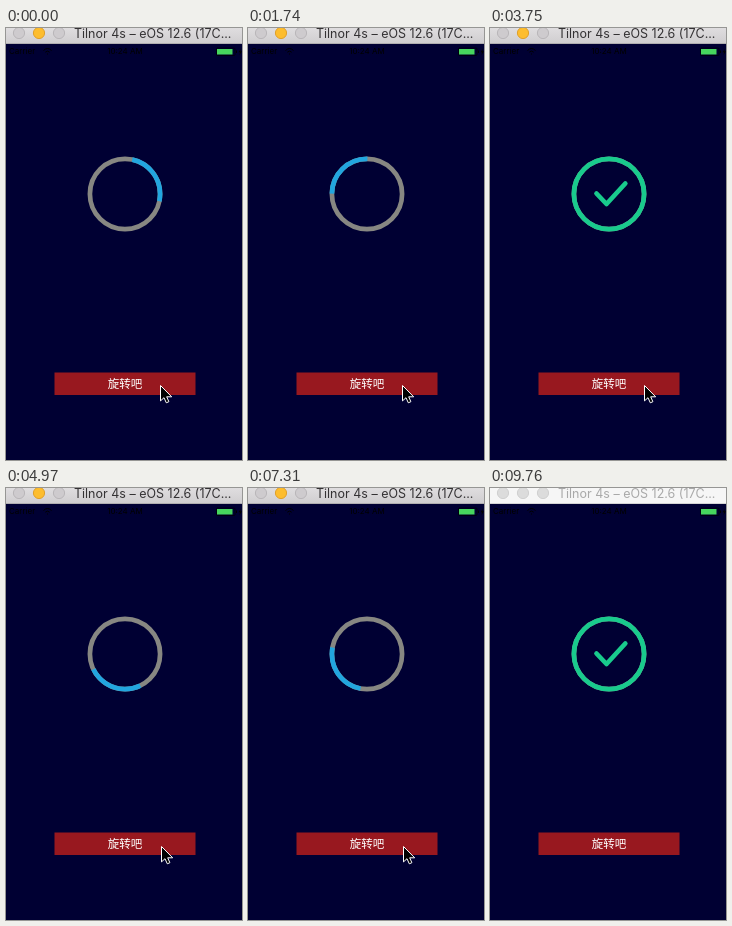
Write an HTML page that moves like this. It is 236 px wide and 432 px high and loops after 9860 ms.

```html
<!DOCTYPE html>
<html lang="zh">
<head>
<meta charset="utf-8">
<title>Loading ring</title>
<style>
  html, body { margin: 0; width: 100%; height: 100%; overflow: hidden; background: #000033; }
  svg { display: block; width: 236px; height: 432px; }
  text { font-family: Inter, Roboto, sans-serif; }
  .bar { fill: url(#metal); }
  .edge { fill: #b0aeb0; }
  .title { font-size: 12.5px; fill: #343234; }
  .lights { fill: #cecbce; stroke: #b9b6b9; }
  .lights .middle { fill: #fdbd2e; stroke: #e0a02a; }
  .inactive .bar { fill: #f6f6f6; }
  .inactive .edge { fill: #d4d4d4; }
  .inactive .title { fill: #a9a9a9; }
  .inactive .lights, .inactive .lights .middle { fill: #dcdcdc; stroke: #d0d0d0; }
  .status { font-size: 8px; fill: #000; }
  .label { font: 11.5px "Noto Sans CJK SC", "Noto Sans CJK", sans-serif; fill: #fff; }
  .line { fill: none; stroke-width: 4.7; }
</style>
</head>
<body>
<svg id="stage" viewBox="0 0 236 432">
  <linearGradient id="metal" x2="0" y2="1">
    <stop stop-color="#dfdddf"/>
    <stop offset="1" stop-color="#d0ced0"/>
  </linearGradient>
  <rect width="236" height="432" fill="#000033"/>
  <rect class="bar" width="236" height="15"/>
  <rect class="edge" y="15" width="236" height="1"/>
  <g class="lights">
    <circle cx="13" cy="5" r="5.6"/>
    <circle class="middle" cx="33" cy="5" r="5.6"/>
    <circle cx="53" cy="5" r="5.6"/>
  </g>
  <text class="title" x="68" y="10">Tilnor 4s – eOS 12.6 (17C...</text>

  <text class="status" x="3" y="26">Carrier</text>
  <path d="M37.5 22.5Q41.5 18.5 45.5 22.5M39.3 24.2Q41.5 22 43.7 24.2M41 26H42" fill="none" stroke="#000"/>
  <text class="status" x="119" y="26" text-anchor="middle">10:24 AM</text>
  <rect x="210.5" y="20" width="18.5" height="7.5" rx="1" fill="none" stroke="#000" stroke-width=".7"/>
  <path d="M230 22.5h1v2.5h-1ZM235 20.5l-2.5 3.7h1.5l-.5 3l2.5-4h-1.6Z"/>
  <rect x="211" y="21" width="15.5" height="5.5" fill="#47d65e"/>

  <circle class="line" cx="119" cy="166" r="35.1" stroke="#878782"/>
  <circle class="line" id="arc" cx="119" cy="166" r="35.1" pathLength="1" transform="rotate(-90 119 166)"/>
  <path class="line" id="check" d="M106.5 165.5L116.5 176L135.3 155.5" pathLength="1"
        stroke="#19cb8d" stroke-linecap="round" stroke-linejoin="round"/>

  <rect x="48.5" y="344.5" width="141" height="22.5" fill="#98181f"/>
  <text class="label" x="119" y="360" text-anchor="middle">旋转吧</text>

  <path id="cursor" d="M0 0V15.4L3.5 12.2L5.8 17.3L8.4 16.2L6.2 11.3H11.2Z" fill="#000" stroke="#fff"/>
</svg>
<script>
const LOOP = 9860, RESTART = 4280, BLUR = 9760;
const SPIN_LENGTH = 0.25;  // arc length while loading, in turns
const DONE_START = 0.764;  // where the green ring begins, in turns
const LEAD = 1.2;          // ticks the success drawing is ahead when it first shows

// Screen updates per run: tick length in ms, the spin as [tick, turns], the tick of success.
const runs = [
  { from: 0, tick: 57.7, doneAt: 46, spin: [[0, 0.033], [19, 2.44], [46, 5.66]] },
  { from: RESTART, tick: 57.2, doneAt: 73, spin: [[0, 0], [12, 1.428], [37, 4.577], [73, 8.97]] }
];

// Keys for the pointer: time, x, y
const pointerPath = [[0, 154.5, 357.5], [RESTART - 1, 154.5, 357.5], [RESTART, 155.5, 358.5],
  [9150, 155.5, 358.5], [9380, 199, 418], [9440, 200, 426]];

const $ = id => document.getElementById(id);
const stage = $('stage'), arc = $('arc'), check = $('check'), cursor = $('cursor');
const clamp = v => Math.max(0, Math.min(1, v));

// cubic-bezier(.25, .1, .25, 1)
function ease(x) {
  x = clamp(x);
  if (x === 0 || x === 1) return x;
  let low = 0, high = 1;
  for (let i = 0; i < 24; i++) {
    const p = (low + high) / 2;
    if (0.75 * p - 0.75 * p * p + p ** 3 < x) low = p; else high = p;
  }
  return 0.3 * low + 2.4 * low ** 2 - 1.7 * low ** 3;
}

function along(keys, at, column = 1) {
  const next = keys.findIndex(key => key[0] > at);
  if (next < 0) return keys[keys.length - 1][column];
  const a = keys[next - 1], b = keys[next];
  return a[column] + (b[column] - a[column]) * (at - a[0]) / (b[0] - a[0]);
}

function draw(t) {
  const run = runs[t < RESTART ? 0 : 1];
  const tick = Math.floor((t - run.from) / run.tick + 0.05);
  const done = tick >= run.doneAt;
  const drawn = tick - run.doneAt + LEAD;

  const begin = done ? DONE_START : along(run.spin, tick) % 1;
  const length = done ? ease(drawn / 9.6) : SPIN_LENGTH;
  arc.setAttribute('stroke', done ? '#19cb8d' : '#22a6df');
  arc.setAttribute('stroke-dasharray', length >= 1 ? 'none' : `${length} ${1 - length}`);
  arc.setAttribute('stroke-dashoffset', -begin);

  check.setAttribute('visibility', done ? 'visible' : 'hidden');
  check.setAttribute('stroke-dasharray', `${ease(drawn / 19.2)} 2`);

  const x = along(pointerPath, t), y = along(pointerPath, t, 2);
  cursor.setAttribute('transform', `translate(${x} ${y})`);
  cursor.setAttribute('visibility', t < 9550 ? 'visible' : 'hidden');
  stage.classList.toggle('inactive', t >= BLUR);
}

const start = performance.now();
function frame() {
  draw((performance.now() - start) % LOOP);
  requestAnimationFrame(frame);
}
frame();
</script>
</body>
</html>
```
